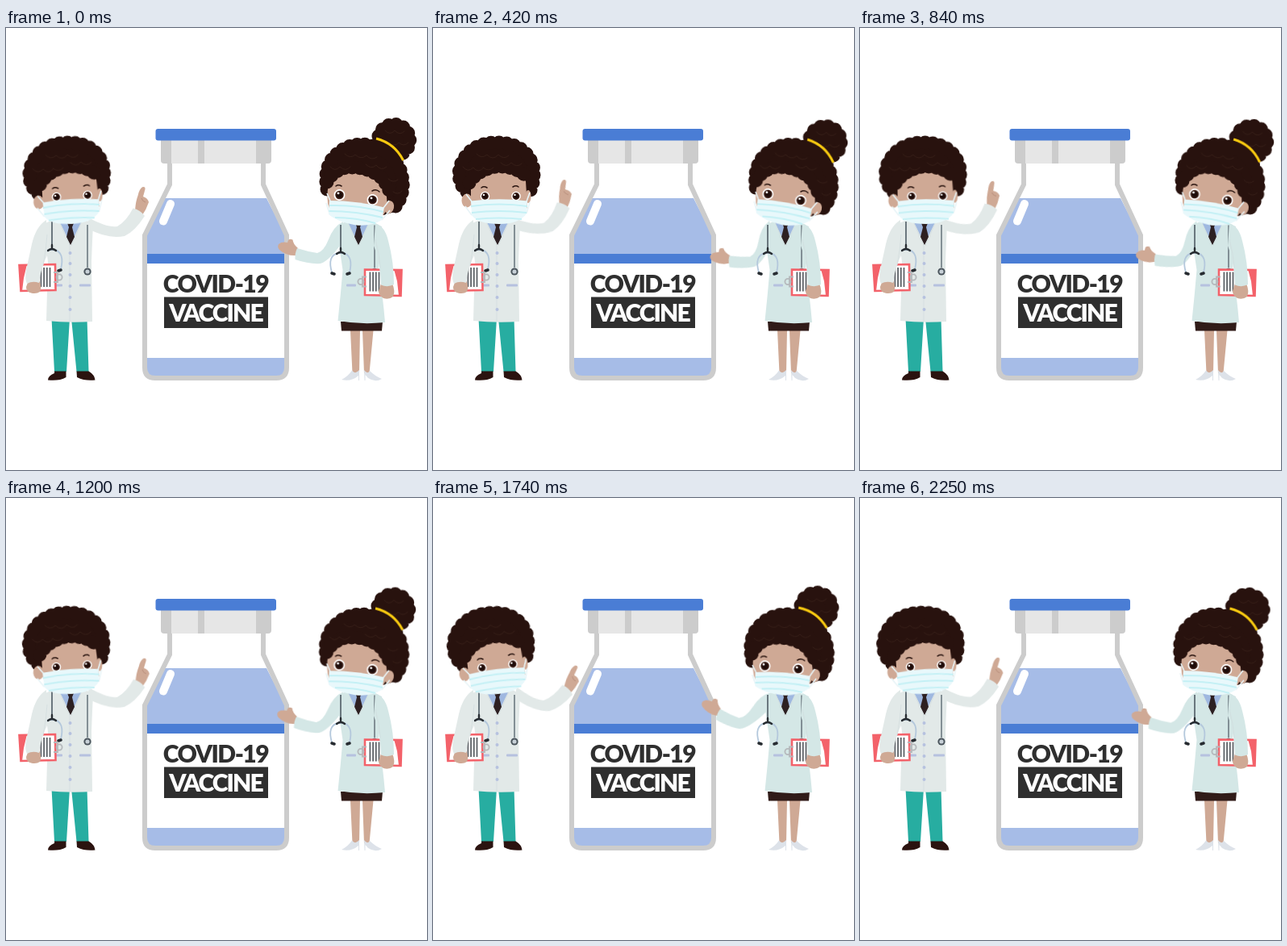
An HTML page for the animation above (2280 ms loop, 522 px wide and 548 px high).

```html
<!DOCTYPE html>
<html lang="en">
<head>
<meta charset="utf-8">
<title>Vaccine</title>
<style>
  html, body { margin: 0; width: 100%; height: 100%; overflow: hidden; background: #fff; }
  svg { display: block; width: 100vw; height: 100vh; }
  text { font: 900 30px Lato, "Open Sans", sans-serif; text-anchor: middle; }

  .skin { fill: #cfa995; }
  .hair { fill: #28120e; }
  .curls { fill: none; stroke: #28120e; stroke-linecap: round; stroke-width: 17; stroke-dasharray: 0 9.5; }
  .wisps { fill: none; stroke: #3a221b; stroke-width: .8; stroke-linecap: round; }
  .brow { fill: none; stroke: #2a1510; stroke-width: 1.5; stroke-linecap: round; }
  .mask { fill: #e8f8fb; }
  .fold { fill: none; stroke: #c4f0f5; stroke-width: 2; }
  .strap { fill: none; stroke: #e8f4f7; stroke-width: 1.6; }
  .his { fill: #e2e9e8; }
  .her { fill: #d4e7e6; }
  .edge { fill: none; stroke: #d0dbdd; stroke-width: .7; }
  .board { fill: #fff; stroke: #f3626a; stroke-width: 2.6; }
  .back { fill: #f3626a; }
  .rows { stroke: #5d6166; stroke-width: 24; stroke-dasharray: 1.8 1.9; }
  .trim { fill: #b6c1df; }

  /* Half-period sine swing, entered at its midpoint */
  .sway { animation: sway 1140ms cubic-bezier(.3642, 0, .6358, 1) -570ms infinite alternate; }
  .his-head { --a: 3.6deg; transform-origin: 80px 240px; }
  .his-arm { --a: -9.4deg; transform-origin: 108px 245px; }
  .her-head { --a: 3.1deg; transform-origin: 437px 243px; }
  .her-arm { --a: -12deg; transform-origin: 413px 244px; }
  @keyframes sway {
    from { transform: rotate(calc(var(--a) * -1)); }
    to { transform: rotate(var(--a)); }
  }
</style>
</head>
<body>
<svg viewBox="0 0 522 548">
  <defs>
    <g id="eye">
      <circle r="5.8" fill="#fff"/>
      <circle r="4.4" fill="#3a1c14"/>
      <circle r="3" fill="#1d0c0a"/>
      <circle cx="-1.5" cy="-1.6" r="1.2" fill="#fff"/>
    </g>
    <g id="shirt">
      <path d="M-13 0H13L0 27Z" fill="#9fb8e0"/>
      <path d="M-4 1H4L2 6L5 18L0 28L-5 18L-2 6Z" fill="#2d2022"/>
    </g>
    <g id="scope" fill="none">
      <path d="M0 -34V-3" stroke="#56636c" stroke-width="1.7"/>
      <path d="M-11 25Q-17 4 -3 1H3Q16 4 11 25" stroke="#b4c8dc" stroke-width="1.8"/>
      <path d="M-5 2Q0 -2 5 2M0 -5V0" stroke="#272c31" stroke-width="2.4" stroke-linecap="round"/>
      <path d="M-11 26l3 1M11 26l-3 1" stroke="#272c31" stroke-width="3.6" stroke-linecap="round"/>
    </g>
    <g id="disc">
      <path d="M0 -58V-5" stroke="#737f87" stroke-width="1.7"/>
      <circle r="4.6" fill="#4b555d"/>
      <circle r="2.6" fill="#c7d0d7"/>
    </g>
    <g id="clip" fill="none" stroke="#b5b8bb" stroke-width="1.8">
      <path d="M-5 -6H0V6H-5"/>
      <circle cx="2" r="3.6"/>
    </g>
  </defs>

  <!-- Bottle -->
  <path d="M197 211H323L347 258V280H174V258ZM174 409H347V424Q347 433 338 433H183Q174 433 174 424Z" fill="#a6bce7"/>
  <path d="M174 280H347V292H174Z" fill="#4a7dd5"/>
  <path d="M203 166V194L172 257V421Q172 434 185 434H335Q348 434 348 421V257L319 194V166" fill="none" stroke="#ccc" stroke-width="6"/>
  <path d="M192 138H329V164Q329 168 325 168H196Q192 168 192 164Z" fill="#ccc"/>
  <path d="M205 138H238V168H205ZM246 138H310V168H246Z" fill="#e6e6e6"/>
  <rect x="185.5" y="125" width="149.5" height="14.5" rx="3" fill="#4a7dd5"/>
  <path d="M204 218L195 239.5" stroke="#fff" stroke-width="10" stroke-linecap="round"/>
  <text x="260" y="328" fill="#2f2f2f" letter-spacing="-1.5">COVID-19</text>
  <rect x="196" y="333.5" width="129" height="38.5" fill="#2f2f2f"/>
  <text x="260" y="363.5" fill="#fff" letter-spacing="-1.9">VACCINE</text>

  <!-- Man -->
  <g>
    <g class="sway his-arm">
      <path class="skin" d="M160 226Q161 214 163.5 208Q165 200 169 197.2Q173 196 172.500 200L170 209Q176 211 177 216Q174 225 169 232Z"/>
      <path d="M168 211Q169 215 173 216" fill="none" stroke="#b98f7c"/>
      <path class="his" d="M102 235Q126 248 138 246Q149 240 157.5 223.5Q166 225 172 233Q160 252 147 258Q126 262 102 249Z"/>
    </g>
    <path d="M56.5 360H79L75 426H60ZM81 360H100.5L102.500 426H87.500Z" fill="#27ada1"/>
    <path d="M60 425.5H74.5V433Q66 438 52 436.5Q52 431 60 428ZM87.5 425.5H102.5Q110 430 110.5 436.5Q98 438 88 433Z" fill="#2b1310"/>
    <path class="his" d="M66 237Q54 238 46 244L52 290L50 363Q78 366 107 364L106 290Q107 262 108 244Q100 237 93 237Z"/>
    <use href="#shirt" x="80" y="241"/>
    <path class="edge" d="M66 240L79 270V364M94 240L81 270"/>
    <g class="trim">
      <circle cx="79.5" cy="279" r="2"/><circle cx="79.5" cy="292" r="2"/>
      <circle cx="79.5" cy="306" r="2"/><circle cx="79.5" cy="320" r="2"/>
      <circle cx="79.5" cy="334" r="2"/><circle cx="79.5" cy="349" r="2"/>
      <rect x="91" y="317.5" width="14" height="3" rx="1"/>
      <rect x="58" y="317.5" width="12" height="3" rx="1"/>
    </g>
    <use href="#scope" x="57" y="274"/>
    <use href="#disc" x="101" y="302"/>
    <path class="board" d="M16.5 294L61 293L61.5 325L18.5 326Z"/>
    <path class="back" d="M16 293H26L22 310L20 326H18Z"/>
    <path class="rows" d="M42.5 309H57"/>
    <use href="#clip" x="64" y="309"/>
    <path class="skin" d="M28 313H41Q45 321 42 327Q38 330 31 328.5Q25 327 25 321Z"/>
    <path class="his" d="M50 238Q37 246 32 268L25 300Q23 311 26 317Q33 313 41 316Q43 298 51 282Z"/>
    <path class="edge" d="M51 256Q50 274 46 294"/>

    <g class="sway his-head">
      <g transform="rotate(-3.3 80 240)">
        <path class="hair" d="M42 207Q28 192 33 168Q46 139 79 139Q114 141 124 170Q128 190 122 206Z"/>
        <path class="curls" d="M42 203Q28 190 34 170Q46 142 79 142Q114 142 124 170Q127 188 121 201"/>
        <ellipse class="skin" cx="42" cy="214" rx="6.5" ry="8.5"/>
        <ellipse class="skin" cx="118" cy="209" rx="3.500" ry="8"/>
        <path class="skin" d="M47 194Q52 180 80 177Q104 175 115 190L117 222Q110 241 82 242Q52 240 47 220Z"/>
        <path class="curls" d="M45 192Q54 177 78 172Q104 171 119 187"/>
        <path class="wisps" d="M37 172q6 8 13 1q6 8 13 0M54 156q6 7 13 1q7 8 14 0q7 7 13 1M84 167q7 7 13 0q7 7 13 1M62 173q7 6 13 0"/>
        <use href="#eye" x="64.5" y="208.5"/>
        <use href="#eye" x="103" y="208.5"/>
        <path class="brow" d="M60 198Q63 195.500 67 198M99 197Q103 194.500 106 197"/>
        <path class="strap" d="M48 215L41 206M48 232L40 221M116 215L120 204M116 230L120 216"/>
        <path class="mask" d="M47 214.5Q82 210 117 214.5L116 230Q107 243 82 243Q56 243 48 232Z"/>
        <path class="fold" d="M47 221Q82 216 117 221M48 229Q82 225 116 229M53 237Q82 234 110 237"/>
      </g>
    </g>
  </g>

  <!-- Woman -->
  <g>
    <path class="skin" d="M427 375H439L438 428H429.5ZM442 375H455.5L450.5 428H444Z"/>
    <path d="M429 424.5Q433 430 438 424V437H437V431Q428 439 416 436Q424 432 429 424.5ZM444 424Q448 430 451 425Q458 432 466 435Q458 440 449 434L445.5 430V437H444.5Z" fill="#dde2e9"/>
    <path d="M415 364H467L466 375.500H416Z" fill="#301b18"/>
    <g class="sway her-arm">
      <path class="skin" d="M362 273Q356 268 355.5 262.5Q350 260 349 266Q342 264.5 338 268Q336 272 339 275Q348 283 360 282Z"/>
      <path class="her" d="M418 240Q406 246 400 262Q394 277 386 279Q373 277 361 273Q358 279 358.5 287Q376 293 390 292Q402 288 418 264Z"/>
    </g>
    <path class="her" d="M422 240Q411 243 411 256L417.5 300Q415 330 411.5 363Q440 368 470 365Q467 330 462 300Q464 270 466 246Q452 240 448 240Z"/>
    <use href="#shirt" x="437" y="241"/>
    <path class="edge" d="M424 241L436 270M450 241L438 270"/>
    <rect class="trim" x="422" y="317.5" width="12" height="3" rx="1"/>
    <use href="#scope" x="415" y="278"/>
    <use href="#disc" x="457" y="302.5"/>
    <path class="board" d="M445 299.500L490.500 300L489.500 332L445 331Z"/>
    <path class="back" d="M481 299H491L489.500 332H487L485 314Z"/>
    <path class="rows" d="M450.5 314.5H465"/>
    <use href="#clip" transform="translate(442 314.5) scale(-1 1)"/>
    <path class="skin" d="M465 317H479Q483 326 480 333Q475 337 468 335Q462 332 462 326Z"/>
    <path class="her" d="M458 242Q470 246 474 264Q481 290 481 318Q473 322 465 318.5Q464 290 456 270Z"/>
    <path class="edge" d="M458 262Q463 280 464 297"/>

    <g class="sway her-head">
      <circle class="hair" cx="481" cy="139" r="22"/>
      <circle class="curls" cx="481" cy="139" r="19.7"/>
      <path class="wisps" d="M470 127q6 7 12 0q6 7 12 1M476 142q6 6 11 0q6 6 12 0"/>
      <path class="hair" d="M398 202Q390 184 400 164Q414 142 442 141Q476 144 490 174Q502 204 482 228L468 232Z"/>
      <path class="curls" d="M398 200Q394 178 403 164Q418 144 442 144Q474 147 488 173Q500 205 478 227"/>
      <path d="M459 137Q482 143 492.5 164" fill="none" stroke="#f8ca10" stroke-width="3"/>
      <path class="skin" d="M402 186Q420 174 450 180Q464 184 471 198L473 222Q468 241 436 244Q404 238 399 218Q397 202 402 186Z"/>
      <ellipse class="skin" cx="475" cy="222" rx="6" ry="8" transform="rotate(12 475 222)"/>
      <path class="curls" d="M398 191Q405 177 423 173Q446 172 462 183Q471 190 476 204"/>
      <path class="wisps" d="M402 172q6 7 12 0q7 7 13 0M420 156q7 7 13 1q7 7 14 1q6 7 13 2M446 169q7 7 13 1q6 8 13 2M474 187q6 6 12 1M480 203q6 5 11 -1"/>
      <use href="#eye" transform="translate(413.5 207) rotate(8) scale(1.2)"/>
      <use href="#eye" transform="translate(454.5 213) rotate(8) scale(1.2)"/>
      <path class="brow" d="M409 196Q412 193.500 416 196M454 202Q459 199 463 203"/>
      <path class="strap" d="M402 214L398 205M401 230L397 217M468 223L475 214M466 238L476 226"/>
      <path class="mask" d="M401 214Q436 214 469 222.5L466 238Q454 246 434 244.5Q410 240 400 231Z"/>
      <path class="fold" d="M401 220Q436 219 468 228M400.5 227Q434 227 467 235M408 235Q434 235 458 242"/>
    </g>
  </g>
</svg>
</body>
</html>
```
